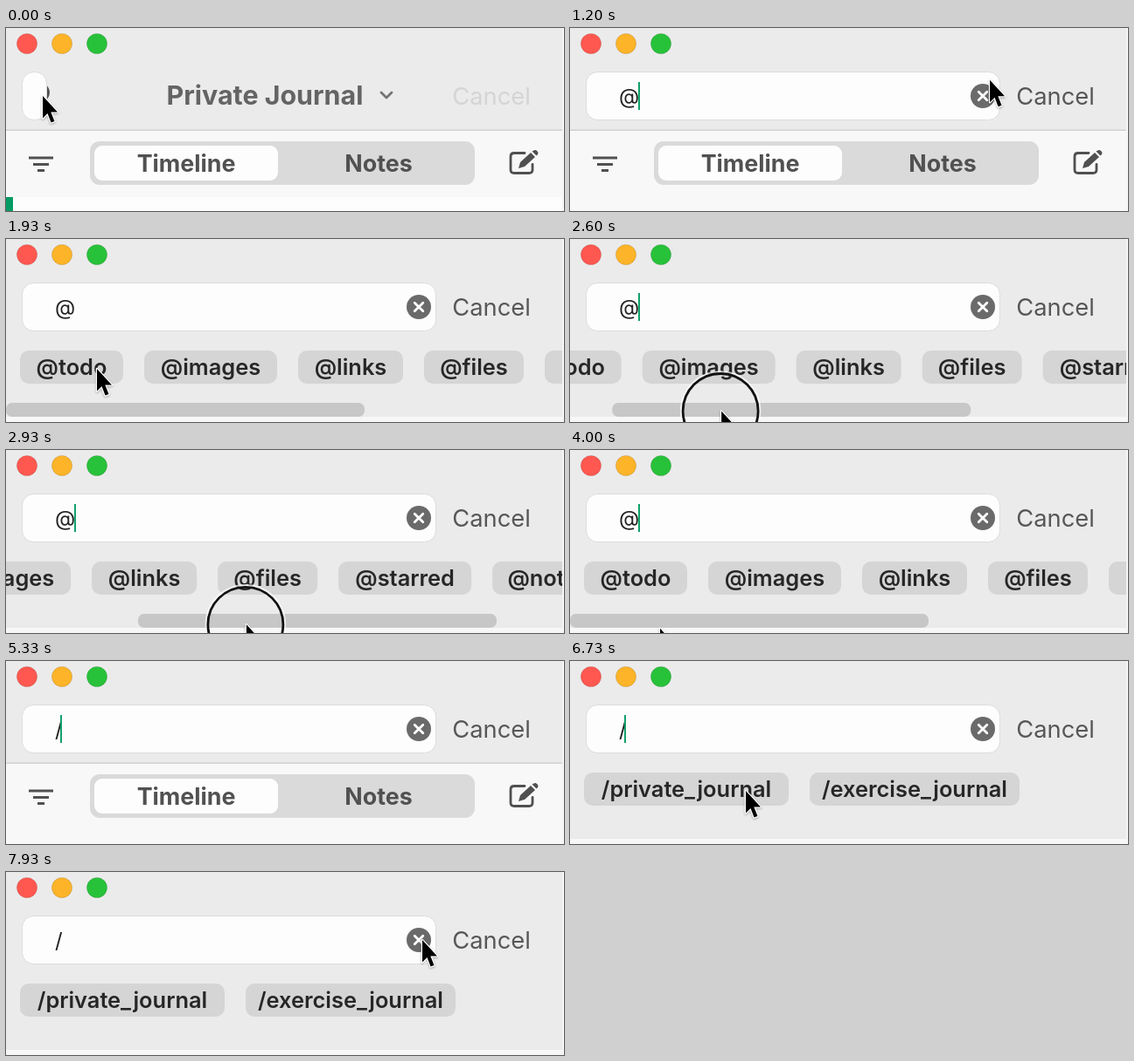
These frames come from a looping animation (638x210 px, 8000 ms). An HTML page:

```html
<!DOCTYPE html>
<html lang="en">
<head>
<meta charset="utf-8">
<title>Journal search</title>
<style>
  html, body { margin: 0; width: 100%; height: 100%; overflow: hidden; background: #ebebeb; }
  svg { display: block; width: 638px; height: 210px; }
  text {
    font-family: Inter, Roboto, sans-serif;
    font-optical-sizing: none;
    font-feature-settings: "calt" 0;
    fill: #515151;
  }
  .mid { text-anchor: middle; }
  .tab { font-size: 26.8px; font-weight: 700; }
  .title { font-size: 30.4px; font-weight: 700; fill: #646464; }
  .chip rect { fill: #d5d5d5; }
  .chip text { font-size: 25.4px; font-weight: 600; fill: #262626; text-anchor: middle; }
  .line { fill: none; stroke: #505050; stroke-width: 2.8; stroke-linecap: round; stroke-linejoin: round; }
  .arrow { filter: drop-shadow(0 1px 1px rgba(0, 0, 0, .3)); }
</style>
</head>
<body>
<svg viewBox="0 0 638 210">
  <rect width="638" height="210" fill="#ebebeb"/>
  <g id="lights"></g>

  <g id="header">
    <circle class="line" cx="38.5" cy="74" r="10"/>
    <text class="mid title" x="296" y="87.5">Private Journal</text>
    <path class="line" d="M429 74l6 6 6-6" style="stroke:#747474"/>
  </g>
  <text id="cancel" class="mid" x="555" y="88" font-size="27.3" style="fill:#575757">Cancel</text>

  <rect id="field" x="18.5" y="50.5" height="55" rx="13" fill="#fdfdfd" stroke="#dcdcdc"/>
  <text id="query" x="56" y="87" font-size="24" style="fill:#222"></text>
  <g id="clear">
    <circle cx="472" cy="78" r="14" fill="#6a6a6a"/>
    <path class="line" d="M467.2 73.2l9.600 9.600m0-9.600l-9.600 9.600" style="stroke:#fff"/>
  </g>
  <rect id="caret" y="62" width="2" height="32" fill="#12a06c"/>

  <g id="tabs">
    <rect y="117" width="638" height="93" fill="#f8f8f8"/>
    <rect y="116.5" width="638" height="1.5" fill="#d2d2d2"/>
    <rect x="96" y="130" width="440" height="50" rx="11" fill="#dadada"/>
    <rect x="101" y="135" width="210" height="40" rx="9" fill="#fdfdfd"/>
    <text class="mid tab" x="206" y="165">Timeline</text>
    <text class="mid tab" x="426" y="165">Notes</text>
    <path class="line" style="stroke-linecap:butt" d="M26 149h28M31 156.5h18M36 163.5h8"/>
    <path class="line" d="M593 143.5h-12q-4 0-4 4v15q0 4 4 4h17q4 0 4-4v-6"/>
    <path d="M586 161l2-7 12-11 5 5-12 11zM601.5 141.5l2-1q2-1 3.500.5l1 1q1 1.500 0 3l-1.500 1.500z" fill="#505050"/>
    <g id="entry">
      <rect y="194" width="638" height="16" fill="#fdfdfd"/>
      <rect y="194" width="8" height="16" fill="#049b64"/>
    </g>
  </g>

  <g id="panel">
    <rect y="204" width="638" height="6" fill="#f7f7f7"/>
    <g id="tags"></g>
    <g id="paths"></g>
    <rect id="bar" y="188" width="410" height="16" rx="7" fill="#c7c7c7"/>
  </g>
  <rect x="636" width="2" height="210" fill="#f5f5f5"/>

  <g id="pointer">
    <g id="ring" fill="none">
      <circle cy="2" r="44" stroke="#fff" stroke-width="4.5" opacity=".7"/>
      <circle cy="2" r="43" stroke="#111" stroke-width="2.8"/>
    </g>
    <path class="arrow" d="M1 2V27.5L6.500 22 10.500 32.500 14.500 31 10.300 20.500H18Z" fill="#000" stroke="#fff" stroke-width="2.5" paint-order="stroke" stroke-linejoin="round"/>
  </g>
</svg>
<script>
const $ = id => document.getElementById(id);
const show = (id, on) => { $(id).style.display = on ? '' : 'none'; };
const within = (t, from, to) => t >= from && t < to;

$('lights').innerHTML = ['#ff5850', '#fdb429', '#28c23a'].map((fill, i) =>
  `<circle cx="${24 + 40 * i}" cy="18" r="11.6" fill="${fill}" stroke="#000" stroke-opacity=".12"/>`).join('');

// Lay out chips in a row, each given as label and width
function chips(id, row) {
  let x = 16;
  for (const [label, width] of row) {
    $(id).innerHTML += `<g class="chip"><rect x="${x}" y="128" width="${width}" height="38" rx="10"/>
      <text x="${x + width / 2}" y="156">${label}</text></g>`;
    x += width + 24;
  }
}
chips('tags', [['@todo', 118], ['@images', 152], ['@links', 120], ['@files', 114], ['@starred', 152], ['@notstarred', 188]]);
chips('paths', [['/private_journal', 234], ['/exercise_journal', 240]]);

const FRAME = 1000 / 15, LOOP = 8000;
const TAG = 933, CLEARED = 4733, SLASH = 5133, SUGGEST = 534, SYNC = 200;

const progress = (t, from, to) => Math.min(1, Math.max(0, (t - from) / (to - from)));
const smooth = u => u * u * (3 - 2 * u);

// Each move: start, end, x, y of its target
const moves = [
  [0, 400, 474, 95],
  [1000, 1267, 480, 51],
  [1400, 1933, 103, 147],
  [1933, 2200, 118, 194],
  [2300, 3133, 300, 199],
  [3260, 4133, 89, 203],
  [4133, 4267, 40, 212],
  [5733, 6533, 126, 146],
  [6667, 6733, 200, 147],
  [6733, 7200, 500, 107],
  [7200, 7533, 475, 76]
];

function pointerAt(t) {
  let x = 41, y = 76;
  for (const [from, to, toX, toY] of moves) {
    const u = smooth(progress(t, from, to));
    x += (toX - x) * u;
    y += (toY - y) * u;
  }
  return [x, y];
}

// The bar trails the dragging pointer slightly
const scrollAt = t => within(t, 2300, 4267) ? Math.max(0, pointerAt(t - 18)[0] - 118.5) : 0;

// The caret stays on for 1200 ms, then off for 600 ms; dragging holds it on
function caretOn(t) {
  if (within(t, 2133, 3600)) return true;
  const since = t >= SLASH ? t - SLASH + 200 : t >= 4200 ? t - 4200 : t - TAG + 600;
  return t >= 400 && (t < TAG || since % 1800 < 1200);
}

function draw(now) {
  const t = Math.floor((now % LOOP) / FRAME + 0.1) * FRAME + 1;
  const text = within(t, TAG, CLEARED) ? '@' : t >= SLASH ? '/' : '';
  const tags = within(t, TAG + SUGGEST, CLEARED), paths = t >= SLASH + SUGGEST;
  const open = progress(t - 1, 0, 333);
  const scroll = scrollAt(t);
  const [x, y] = pointerAt(t);

  show('header', t < 400);
  $('field').setAttribute('width', 28 + 445 * (1 - (1 - open) ** 2));
  $('cancel').setAttribute('opacity', 0.15 + 0.85 * open);

  $('query').textContent = text;
  show('clear', text);
  $('caret').setAttribute('x', { '': 56, '@': 78, '/': 62 }[text]);
  show('caret', caretOn(t));

  show('tabs', !tags && !paths);
  show('entry', t < TAG + SYNC || within(t, 4867, SLASH + SYNC));
  show('panel', tags || paths);
  show('tags', tags);
  show('bar', tags);
  show('paths', paths);
  $('tags').setAttribute('transform', `translate(${-scroll * 1.5625})`);
  $('bar').setAttribute('x', scroll);

  show('pointer', t < TAG || within(t, 1067, 4267) || t >= 5733);
  show('ring', within(t, 2400, 4000));
  $('pointer').setAttribute('transform', `translate(${x} ${y})`);
}

const start = performance.now();
function tick() {
  draw(performance.now() - start);
  requestAnimationFrame(tick);
}
tick();
</script>
</body>
</html>
```
